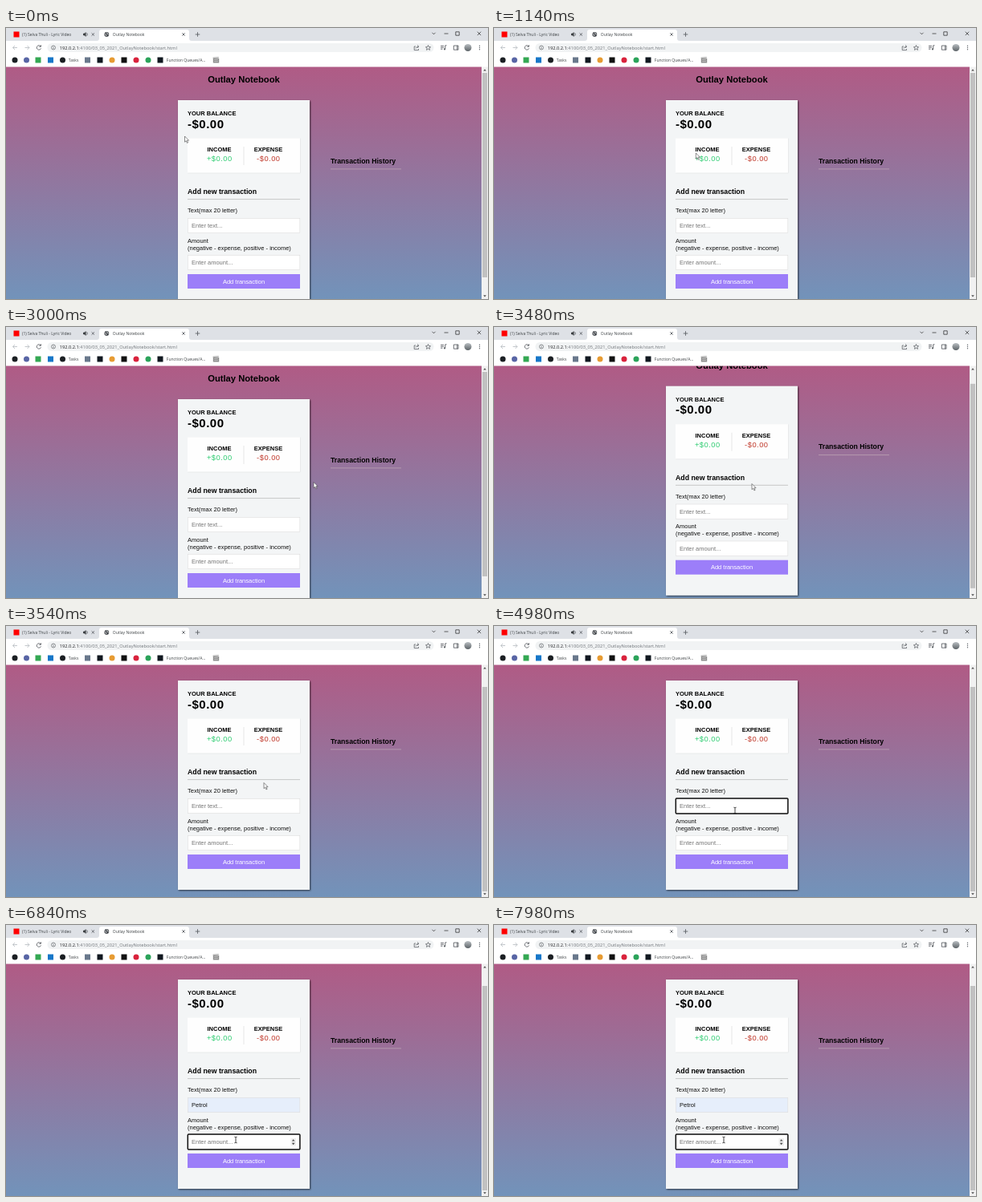
Write an HTML page that moves like this. It is 600x338 px and loops after 8 s.

```html
<!DOCTYPE html>
<html lang="en">
<head>
<meta charset="utf-8">
<title>Outlay Notebook</title>
<style>
  html, body { margin: 0; width: 100%; height: 100%; overflow: hidden; background: #fff; }
  svg { display: block; width: 100vw; height: 100vh; }
  text { font-family: "Liberation Sans", Arial, sans-serif; font-size: 7.5px; fill: #111; white-space: pre; }
  .ui text { font-family: "Open Sans", sans-serif; font-size: 5px; fill: #3c4043; }
  .ui .url { font-size: 5.7px; fill: #70757a; }
  .ui .host { fill: #202124; }
  .icon { fill: none; stroke: #5f6368; stroke-width: .9; }
  .dim { stroke: #bdc1c6; }
  .bold { font-weight: 700; fill: #000; }
  .mid { text-anchor: middle; }
  .hint { fill: #757575; }
  .field { fill: #fff; stroke: #dedede; stroke-width: .6; }
  .focus { fill: none; stroke: #101010; stroke-width: 1.5; }
  .caret { stroke: #000; stroke-width: .7; }
</style>
</head>
<body>
<svg viewBox="0 0 600 338">
  <defs>
    <linearGradient id="sky" x2="0" y2="1">
      <stop stop-color="#b05b85"/><stop offset="1" stop-color="#7293ba"/>
    </linearGradient>
    <linearGradient id="face" x2="0" y2="1">
      <stop stop-color="#b9bec2"/><stop offset="1" stop-color="#5d6468"/>
    </linearGradient>
    <linearGradient id="fade">
      <stop stop-color="#dee1e6" stop-opacity="0"/><stop offset="1" stop-color="#dee1e6"/>
    </linearGradient>
    <filter id="shade" x="-10%" y="-10%" width="120%" height="120%">
      <feDropShadow dx="1" dy="1" stdDeviation=".8" flood-color="#000" flood-opacity=".65"/>
    </filter>
    <filter id="soft"><feDropShadow dx=".4" dy=".4" stdDeviation=".6" flood-opacity=".12"/></filter>
    <clipPath id="view"><path d="M0 48.5H592V338H0Z"/></clipPath>
  </defs>

  <rect y="48" width="592" height="290" fill="url(#sky)"/>
  <g clip-path="url(#view)">
    <g id="page">
      <text class="bold mid" x="296" y="68" style="font-size:11.2px">Outlay Notebook</text>
      <rect x="214" y="90" width="164" height="261" fill="#f3f5f6" filter="url(#shade)"/>
      <text class="bold" x="226" y="109">YOUR BALANCE</text>
      <text class="bold" x="226" y="124.6" style="font-size:15px;letter-spacing:.5px">-$0.00</text>

      <rect x="226" y="137.5" width="140" height="43" fill="#fefefe" filter="url(#soft)"/>
      <path d="M296 148V171" stroke="#dedede" stroke-width=".7"/>
      <text class="bold mid" x="265.5" y="153.8">INCOME</text>
      <text class="bold mid" x="326.5" y="153.8">EXPENSE</text>
      <g class="mid" style="letter-spacing:.5px">
        <text x="265.8" y="166.3" style="font-size:9.3px;fill:#2ecc71">+$0.00</text>
        <text x="326.8" y="166.3" style="font-size:9.3px;fill:#c0392b">-$0.00</text>
      </g>

      <text class="bold" x="226" y="207" style="font-size:8.75px">Add new transaction</text>
      <path d="M226 213.6H366" stroke="#bbb" stroke-width=".8"/>
      <text x="226" y="230.4">Text(max 20 letter)</text>
      <rect id="nameBox" class="field" x="226.3" y="237.3" width="139.5" height="18.4"/>
      <text id="name" x="231" y="249.3"></text>
      <text x="226" y="267.6">Amount</text>
      <text x="226" y="276.5">(negative - expense, positive - income)</text>
      <rect class="field" x="226.3" y="283.3" width="139.5" height="18.4"/>
      <text class="hint" x="231" y="295.3">Enter amount...</text>
      <g id="spinner">
        <rect x="354.5" y="288" width="6.5" height="9.4" fill="#efefef"/>
        <path d="M355.8 291.6L357.7 289.2 359.6 291.6ZM355.8 293.8L357.7 296.2 359.6 293.8Z" fill="#505050"/>
      </g>
      <rect x="226" y="307" width="140" height="18" fill="#9c7ef9"/>
      <text class="mid" x="296" y="318.7" style="fill:#fff">Add transaction</text>

      <rect id="ring" class="focus" x="226.3" y="237.1" width="139.6" height="18.8" rx="1"/>
      <path id="caret" class="caret" d="M231.4 242.2V250.8"/>

      <text class="bold" x="404" y="168.6" style="font-size:8.7px">Transaction History</text>
      <path d="M404 175.9H492" stroke="#bba3b3" stroke-width=".8"/>
    </g>
  </g>

  <rect x="592" y="48" width="8" height="290" fill="#f1f1f1"/>
  <rect id="thumb" x="593" y="56" width="6" height="255" fill="#c1c1c1"/>
  <path d="M594.2 53.4L596 51.2 597.8 53.4ZM594.2 333.2L596 335.4 597.8 333.2Z" fill="#505050"/>

  <g class="ui">
    <rect width="600" height="16" fill="#dee1e6"/>
    <rect y="16" width="600" height="32.5" fill="#fff"/>
    <path d="M113 16Q116 16 116 13V5Q116 2 119 2H225Q228 2 228 5V13Q228 16 231 16Z" fill="#fff"/>
    <rect x="9.5" y="4.5" width="7" height="7" fill="#f00"/>
    <text x="20" y="9.9">(1) Selva Thuli - Lyric Video</text>
    <rect x="82" y="3" width="11" height="10" fill="url(#fade)"/>
    <path d="M96 6.8H97.5L99.5 5V11L97.5 9.2H96Z" fill="#3c4043"/>
    <path class="icon" d="M100.6 6.2Q102 8 100.6 9.8M106.6 6.3L110 9.7M110 6.3L106.6 9.7M219.3 6.3L222.7 9.7M222.7 6.3L219.3 9.7M238.5 5.2V10.8M235.7 8H241.3"/>
    <circle cx="125.3" cy="8" r="2.9" fill="#4d5156"/>
    <path d="M123.2 7Q125 8 124.6 10M125.5 5.6Q126 8 127.6 8" stroke="#fff" stroke-width=".7" fill="none"/>
    <text x="132.8" y="9.9">Outlay Notebook</text>
    <path class="icon" style="stroke:#222;stroke-width:.7" d="M530.5 5.8L532.5 7.8 534.5 5.8M545.5 7H550.5M559.8 4.8H564.2V9.2H559.8ZM586.8 4.7L591.2 9.1M591.2 4.7L586.8 9.1"/>

    <path class="icon dim" d="M14 24.5H8.5M11 22L8.5 24.5 11 27M23.5 24.5H29M26.5 22L29 24.5 26.5 27"/>
    <path class="icon" d="M43 22.7A2.7 2.7 0 1 0 43.5 25.4M43.5 21.3V23.3H41.4"/>
    <rect x="51.5" y="19" width="481" height="11" rx="5.5" fill="#f1f3f4"/>
    <circle class="icon" cx="59" cy="24.5" r="2.5" style="stroke-width:.7"/>
    <path class="icon" style="stroke-width:.7" d="M59 24V26M59 22.8V23.4"/>
    <text class="url" x="66.8" y="26.5"><tspan class="host">192.0.2.1</tspan>:4100/03_05_2021_OutlayNotebook/start.html</text>
    <path class="icon" style="stroke-width:.8" d="M510 23H508.2V27.6H513.5V26M510 25.6Q510.5 23.3 513.6 23.2M512 21.4L513.9 23.2 512 25M525.5 21.5L526.4 23.6 528.6 23.8 526.9 25.2 527.5 27.4 525.5 26.2 523.5 27.4 524.1 25.2 522.4 23.8 524.6 23.6Z"/>
    <path class="icon" d="M541 22.4H545M541 24.3H545M541 26.2H543.5M546.7 26.3V21.8H548.5M557.3 22H563V27.2H557.3ZM561.6 22V27.2"/>
    <circle cx="546" cy="26.4" r="1.1" fill="#5f6368"/>
    <circle cx="575" cy="24.5" r="4.5" fill="url(#face)"/>
    <g fill="#5f6368"><circle cx="589.5" cy="22.3" r=".7"/><circle cx="589.5" cy="24.5" r=".7"/><circle cx="589.5" cy="26.7" r=".7"/></g>

    <g id="marks"></g>
    <text x="77.8" y="41.9">Tasks</text>
    <text x="199.8" y="41.9">Function Queues/A...</text>
    <path d="M257.8 38H265.2V43.5H257.8ZM257.6 36.8L264.8 36.3V37.3L257.6 37.7Z" fill="#8d8d8d"/>
    <path d="M259 39.5H264M259 41.5H264" stroke="#ddd" stroke-width=".6"/>
  </g>

  <g id="pointer">
    <path id="arrow" d="M0 0V7.2L1.7 5.7 2.9 8.4 4.1 7.9 2.9 5.2H5.1Z" fill="#fff" stroke="#333" stroke-width=".55"/>
    <path id="beam" d="M-1.6 -3.8Q0 -3.8 0 -3V3Q0 3.8 -1.6 3.8M1.6 -3.8Q0 -3.8 0 -3M0 3Q0 3.8 1.6 3.8" fill="none" stroke="#111" stroke-width=".8"/>
  </g>
</svg>
<script>
  const LOOP = 8000, STEP = 60, BLINK = 300;
  const NAME_FOCUS = 3960, TYPING = 5040, FILLED = 5400, AMOUNT_FOCUS = 5820;
  const el = id => document.getElementById(id);
  const show = (id, on) => el(id).setAttribute('visibility', on ? 'visible' : 'hidden');
  const move = (id, x, y) => el(id).setAttribute('transform', `translate(${x} ${y})`);

  // Bookmark icons: centre x, colour, round or square
  const marks = [
    [11, '#1b1f23', 1], [25.5, '#5865a5', 1], [40, '#34a853', 0], [55.5, '#1677c8', 0],
    [70.5, '#1b1f23', 1], [101.5, '#69788c', 0], [117, '#111820', 0], [132, '#e79b32', 1],
    [147, '#111', 0], [162, '#d9223c', 1], [177, '#2ba35a', 1], [192, '#111820', 0]
  ];
  el('marks').innerHTML = marks.map(([x, color, round]) =>
    `<rect x="${x - 3.5}" y="36.5" width="7" height="7" rx="${round ? 3.5 : 0}" fill="${color}"/>`).join('');

  // Time, x, y
  const path = [
    [0, 222.5, 135], [780, 226, 134], [1260, 256, 160], [1680, 288, 204], [2040, 272, 247],
    [2160, 272, 247], [2520, 283, 288], [2940, 383, 193.5], [3120, 383, 193.5],
    [3480, 321, 195.5], [3600, 321, 195.5], [3900, 300, 230], [5160, 300, 230], [5580, 286, 268],
    [LOOP, 286, 268]
  ];
  const ease = u => u * u * (3 - 2 * u);
  const ramp = (t, from, to) => ease(Math.min(1, Math.max(0, (t - from) / (to - from))));

  function pointerAt(t) {
    const i = path.findIndex(p => p[0] > t);
    const a = path[i - 1], b = path[i], k = ramp(t, a[0], b[0]);
    return [a[1] + (b[1] - a[1]) * k, a[2] + (b[2] - a[2]) * k];
  }

  function draw(t) {
    const scroll = ramp(t, 3360, 3540);
    move('page', 0, -22 * scroll);
    move('thumb', 0, 20 * scroll);

    const [x, y] = pointerAt(t), text = t >= 3780;
    move('pointer', x, y);
    show('arrow', !text);
    show('beam', text);

    const typed = t < TYPING ? '' : 'Petrol'.slice(0, 1 + Math.floor((t - TYPING) / STEP));
    const name = el('name');
    name.textContent = typed || 'Enter text...';
    name.setAttribute('class', typed ? '' : 'hint');
    el('nameBox').style.fill = t >= FILLED ? '#e6eefb' : '#fff';

    const onAmount = t >= AMOUNT_FOCUS;
    const since = t - (onAmount ? AMOUNT_FOCUS : NAME_FOCUS);
    const caretOn = since >= 0 && Math.floor(since / BLINK) % 2 === 0 && (onAmount || !typed);
    show('ring', since >= 0);
    show('caret', caretOn);
    move('ring', 0, onAmount ? 46 : 0);
    move('caret', 0, onAmount ? 46 : 0);
    show('spinner', t >= 5520);
  }

  const start = performance.now();
  function tick() {
    const t = (performance.now() - start) % LOOP;
    draw(Math.floor(t / STEP) * STEP);
    requestAnimationFrame(tick);
  }
  tick();
</script>
</body>
</html>
```
